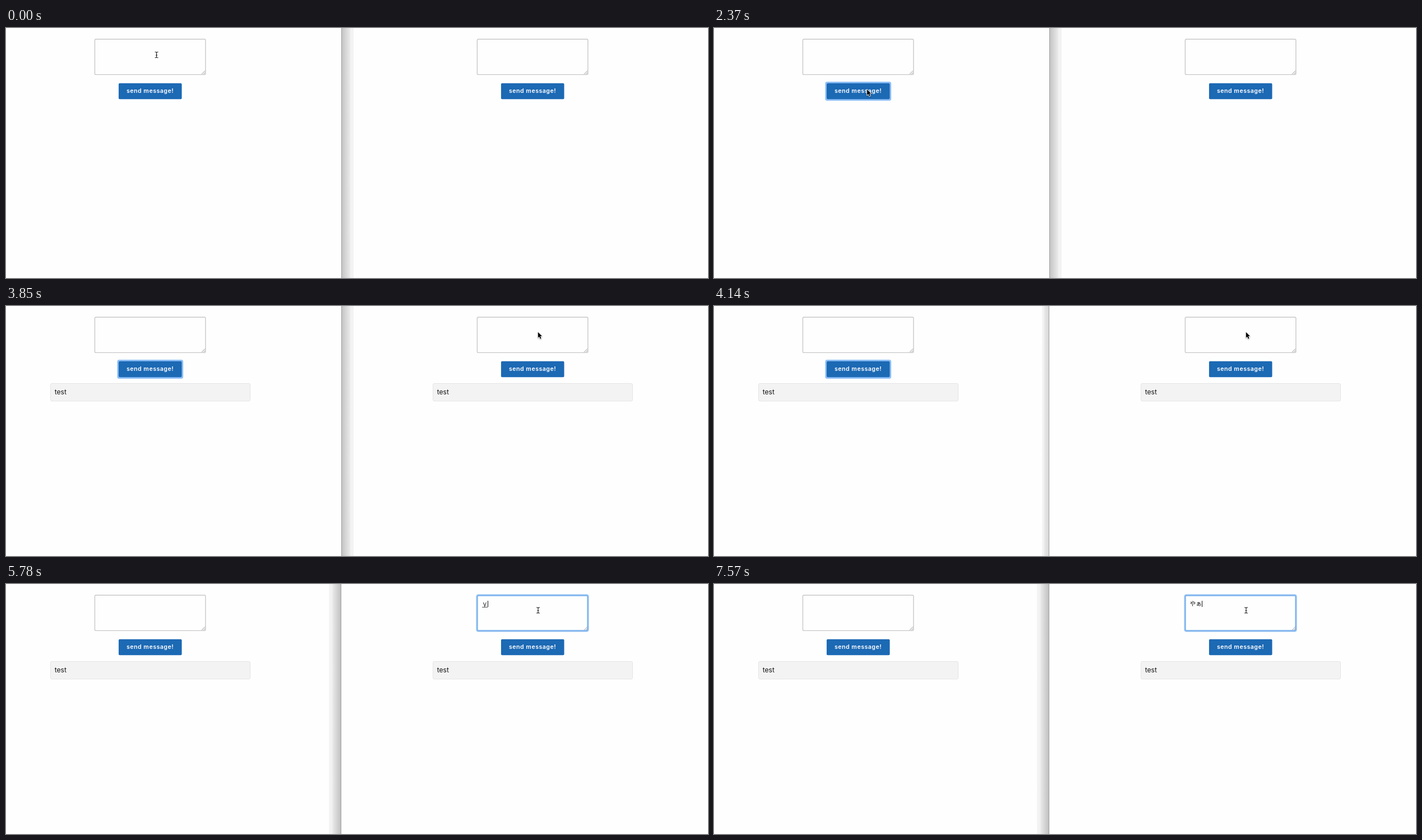
These frames come from a looping animation (1252 by 447 pixels, 8 s). An HTML page with a canvas:

```html
<!DOCTYPE html>
<html lang="en">
<head>
<meta charset="utf-8">
<title>Message form</title>
<style>
html, body { margin: 0; width: 100%; height: 100%; overflow: hidden; background: #fefefe; }
canvas { display: block; }
</style>
</head>
<body>
<canvas id="stage" width="1252" height="447"></canvas>
<script>
const LOOP = 8000;
const SANS = '"Liberation Sans", Arial, sans-serif';
const UI = 'Inter, Arial, sans-serif';
const CJK = '"Noto Sans CJK JP", "Noto Sans CJK", sans-serif';
const RIGHT = 682; // offset of the right page
const c = document.getElementById('stage').getContext('2d');

function box(x, y, w, h, r, fill, line, width = 1) {
  c.beginPath();
  c.roundRect(x, y, w, h, r);
  if (fill) { c.fillStyle = fill; c.fill(); }
  if (line) { c.strokeStyle = line; c.lineWidth = width; c.stroke(); }
}

function text(s, x, y, font, color, spacing = 0) {
  c.font = font;
  c.letterSpacing = spacing + 'px';
  c.fillStyle = color;
  c.fillText(s, x, y);
}

function segments(color, width, list) {
  c.strokeStyle = color;
  c.lineWidth = width;
  c.beginPath();
  for (const [x1, y1, x2, y2] of list) { c.moveTo(x1, y1); c.lineTo(x2, y2); }
  c.stroke();
}

function caret(x, y, h) {
  c.fillStyle = '#111';
  c.fillRect(x, y, 1, h);
}

function field(focus) {
  if (focus) {
    box(157.5, 19.5, 199, 65, 3, null, 'rgba(120,175,240,.45)', 3);
    box(158.5, 20.5, 197, 63, 2, '#fefefe', '#7db4ee', 2.4);
  } else {
    box(158.4, 20, 197.4, 63.4, 2, '#fefefe', '#c8c8c8', 1.4);
  }
  segments('#8a8a8a', 0.9, [[349, 82.5, 355, 76.5], [352.3, 82.5, 355, 79.8]]);
}

function button(focus) {
  if (focus) box(199.8, 97.6, 114.8, 30.8, 2, null, '#8fc0f8', 3);
  box(200.9, 98.7, 112.6, 28.5, 2, '#1c69b4');
  text('send message!', 215, 116, '600 10.6px ' + UI, '#fff', 0.5);
}

function message() {
  box(79.5, 138.5, 356, 31.5, 2.5, '#f3f3f3', '#e5e5e5');
  text('test', 86.8, 158.4, '12px ' + UI, '#111');
}

function page(dx, fieldFocus, buttonFocus, sent) {
  c.save();
  c.translate(dx, 0);
  field(fieldFocus);
  button(buttonFocus);
  if (sent) message();
  c.restore();
}

// Window edge at x = 598; dir is the side the shadow falls on.
function edge(dir, depth, tone) {
  const end = 598 + dir * depth;
  const g = c.createLinearGradient(598, 0, end, 0);
  g.addColorStop(0, tone);
  g.addColorStop(0.7, '#e9e9e9');
  g.addColorStop(0.72, '#f1f1f1');
  g.addColorStop(1, '#f4f4f4');
  c.fillStyle = g;
  c.fillRect(Math.min(598, end), 0, depth, 447);
  c.fillStyle = '#a0a0a0';
  c.fillRect(dir > 0 ? 598 : 597, 0, 1, 447);
}

function beam(x, y) {
  const parts = [[0, -4, 0, 4], [-3, -5, -1, -5], [1, -5, 3, -5],
    [-3, 5, -1, 5], [1, 5, 3, 5], [-1, -5, 0, -4], [1, -5, 0, -4],
    [-1, 5, 0, 4], [1, 5, 0, 4], [-1.5, 0.5, 1.5, 0.5]];
  c.save();
  c.translate(x, y);
  segments('rgba(255,255,255,.8)', 2.6, parts);
  segments('#222', 1.1, parts);
  c.restore();
}

function arrow(x, y) {
  c.save();
  c.translate(x, y);
  c.beginPath();
  [[0, 0], [0, 10.2], [2.3, 8.1], [4, 12], [5.8, 11.2], [4.1, 7.4], [7.2, 7.3]]
    .forEach(p => c.lineTo(...p));
  c.closePath();
  c.lineJoin = 'round';
  c.strokeStyle = '#fff';
  c.lineWidth = 1.6;
  c.shadowColor = 'rgba(0,0,0,.3)';
  c.shadowBlur = 2;
  c.shadowOffsetY = 1;
  c.stroke();
  c.shadowColor = 'transparent';
  c.fillStyle = '#000';
  c.fill();
  c.restore();
}

function popup(first, second) {
  c.save();
  c.shadowColor = 'rgba(0,0,0,.4)';
  c.shadowBlur = 5;
  c.shadowOffsetY = 2;
  box(845, 40, 90, 41, 1, '#fff');
  c.restore();
  box(845.3, 40.5, 89.2, 40, 1, '#fff', '#a2a2a2');
  const font = '500 10px ' + CJK;
  text(first, 848.5, 51.3, font, '#111');
  text(second, 848.5, 63.8, font, '#111');
  text('ひらがな', 848.5 + 10 * second.length + 5.5, 63.2, '8.6px ' + CJK, '#9a9a9a');
  segments('#a8443f', 1, [[846, 66.5, 934, 66.5]]);
  text('Tabキーで選択', 848.5, 78, '500 9.8px ' + CJK, '#111');
}

// Last value whose start time has passed.
function at(t, list) {
  let value = list[0][1];
  for (const [start, v] of list) if (t >= start) value = v;
  return value;
}

// Position along a move that is captured in a fixed number of steps.
function travel(t, start, end, steps, from, to) {
  const k = Math.min(1, Math.max(0, Math.floor((t - start) / (end - start) * steps + 0.05) / steps));
  const e = k * k * (3 - 2 * k);
  return from.map((v, i) => v + (to[i] - v) * e);
}

function pointer(t) {
  if (t < 500) return beam(268.5, 48);
  if (t < 2080) return beam(279.5, 47.5);
  if (t < 3120) return arrow(...travel(t, 1930, 2230, 2, [279, 46], [273, 110]));
  if (t < 4730) return arrow(...travel(t, 3120, 3850, 5, [279.3, 107.7], [948.8, 46.7]));
  beam(949, 47);
}

function leftTyping(t) {
  if (t < 730 || t >= 2370) return;
  const s = at(t, [[0, ''], [1480, 'te'], [1780, 'test']]);
  text(s, 166, 38, '11px ' + SANS, '#111');
  if (t < 1180 || t >= 1480) caret(166 + Math.round(c.measureText(s).width), 28, 12);
}

function rightTyping(t) {
  if (t < 4730) return;
  const s = at(t, [[0, ''], [5780, 'ｙ'], [5930, 'や'], [6830, 'やｘ'], [7120, 'やぁ']]);
  text(s, 848.5, 39.3, '500 10.7px ' + CJK, '#111');
  const composing = t >= 5780 && t < 7570;
  if (composing) segments('#555', 1, [[849, 41.5, 848.5 + 10.7 * s.length, 41.5]]);
  if (t >= 5930 && t < 7120) popup('屋', 'や');
  if (t >= 7120 && t < 7420) popup('やぁ', 'やぁ');
  const hidden = (t >= 5330 && t < 5780) || (t >= 6380 && t < 6830);
  if (!hidden) caret(s ? 848 + Math.round(10.9 * s.length) : 848, s ? 30 : 28, s ? 11 : 12);
}

function draw(t) {
  c.fillStyle = '#fefefe';
  c.fillRect(0, 0, 1252, 447);
  if (t < 4140) edge(1, 22, '#c2c2c2');
  else if (t < 4290) edge(-1, 13, '#d6d6d6');
  else edge(-1, 22, '#bebebe');
  const sent = t >= 2520;
  page(0, t >= 730 && t < 2370, t >= 2370 && t < 4290, sent);
  page(RIGHT, t >= 4730, false, sent);
  leftTyping(t);
  rightTyping(t);
  pointer(t);
}

function tick() {
  draw(performance.now() % LOOP);
  requestAnimationFrame(tick);
}
draw(0);
requestAnimationFrame(tick);
</script>
</body>
</html>
```
